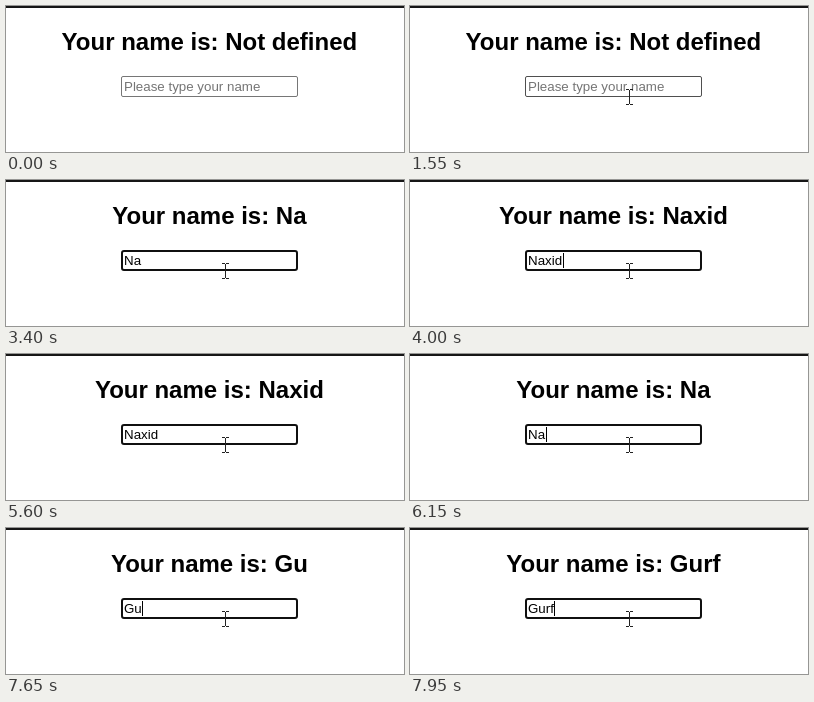
An HTML page that plays this animation: 398 by 146 pixels, repeating every 8000 ms.

```html
<!DOCTYPE html>
<html lang="en">
<head>
<meta charset="utf-8">
<title>Name form</title>
<style>
  html, body { margin: 0; width: 100%; height: 100%; overflow: hidden; background: #fff; }
  body { position: relative; font-family: Arial, "Liberation Sans", sans-serif; color: #000; }
  body > * { position: absolute; box-sizing: border-box; }
  .bar { left: 0; top: 0; width: 100%; height: 2px; background: #161616; }
  h2 { left: 8.4px; top: 22px; width: 390px; margin: 0; font-size: 24px; line-height: 27px;
       text-align: center; white-space: nowrap; }
  .field { left: 115px; top: 70px; width: 177px; height: 21px; border: 1px solid #767676; border-radius: 2px; }
  .field.hover { border-color: #4f4f4f; }
  .field.focus { border: 2px solid #101010; border-radius: 3px; }
  .text { left: 118px; top: 73px; font-size: 13.333px; line-height: 15px; white-space: pre; }
  .text.empty { color: #757575; }
  .caret { top: 73px; width: 1px; height: 15px; background: #000; }
  svg { left: 0; top: 0; width: 100%; height: 100%; }
</style>
</head>
<body>
<div class="bar"></div>
<h2>Your name is: <span id="name">Not defined</span></h2>
<div class="field" id="field"></div>
<span class="text empty" id="text">Please type your name</span>
<div class="caret" id="caret"></div>
<svg>
  <g id="cursor">
    <path id="arrow" d="M.5.5V16.5L4.3 13 6.7 18.5 9 17.5 6.6 12H11.7Z" fill="#fff" stroke="#000"/>
    <path id="beam" d="M-3-7.5h3M1-7.5h3M.5-7V7M-3 7.5h3M1 7.5h3" stroke="#222" shape-rendering="crispEdges"/>
  </g>
</svg>
<script>
  const LOOP = 8000, TICK = 50, FOCUS = 1650;
  const MOVE = { start: 1200, end: 1500, from: [228, 146], to: [219, 91] };

  // [time, value of the field]
  const typing = [
    [0, ""], [2650, "N"], [2850, "Na"], [3750, "Nax"], [3850, "Naxi"], [4000, "Naxid"],
    [5650, "Naxi"], [5850, "Nax"], [6050, "Na"], [6200, "N"], [6400, ""],
    [7250, "G"], [7650, "Gu"], [7800, "Gur"], [7950, "Gurf"]
  ];
  // caret switches on, off, on, ...
  const blinks = [FOCUS, 2150, 2650, 3400, 3750, 4550, 5050, 5600, 5650, 6650, 7200];

  const el = id => document.getElementById(id);
  const [name, field, text, caret, cursor, arrow, beam] =
    ["name", "field", "text", "caret", "cursor", "arrow", "beam"].map(el);
  const show = (node, on) => { node.style.visibility = on ? "visible" : "hidden"; };

  function drawCursor(t) {
    const p = Math.min(1, Math.max(0, (t - MOVE.start) / (MOVE.end - MOVE.start)));
    const ease = 1 - (1 - p) ** 2;
    const [x, y] = MOVE.from.map((a, i) => Math.round(a + (MOVE.to[i] - a) * ease));
    const over = y <= 92;
    cursor.setAttribute("transform", `translate(${x} ${y})`);
    show(arrow, t >= MOVE.start && !over);
    show(beam, over);
    field.classList.toggle("hover", over);
  }

  function drawText(t) {
    const value = typing.filter(([at]) => at <= t).pop()[1];
    name.textContent = value || "Not defined";
    text.textContent = value || "Please type your name";
    text.classList.toggle("empty", !value);
    const width = value ? text.getBoundingClientRect().width : 0;
    caret.style.left = Math.floor(118 + width) + 1 + "px";
    show(caret, blinks.filter(at => at <= t).length % 2);
  }

  let last = -1;
  function frame() {
    const t = Math.floor((performance.now() % LOOP) / TICK) * TICK;
    if (t !== last) {
      last = t;
      drawCursor(t);
      drawText(t);
      field.classList.toggle("focus", t >= FOCUS);
    }
    requestAnimationFrame(frame);
  }
  frame();
</script>
</body>
</html>
```
